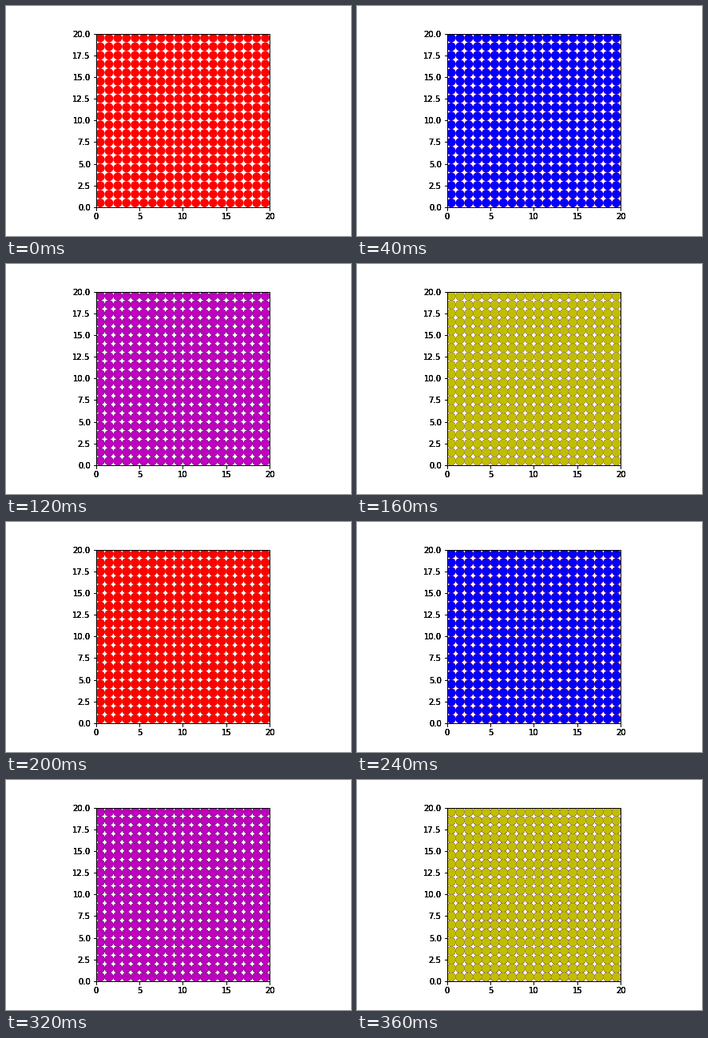
Write a matplotlib script that moves like this. It is 432 px wide and 288 px high and loops after 0.4 s.

```python
import numpy as np
import matplotlib.pyplot as plt
from matplotlib.animation import FuncAnimation
from matplotlib.collections import PatchCollection
from matplotlib.patches import Circle

plt.rcParams.update({"font.family": "DejaVu Sans", "font.size": 10})

SIZE = 20
FRAMES = 10
COLORS = "rbgmy"
INK_PASSES = 4  # repeated axes give the dense, hard-edged labels

fig = plt.figure(figsize=(6, 4), dpi=72, facecolor="white")
fig.subplots_adjust(left=0.125, right=0.9, bottom=0.125, top=0.88)


def add_axes(facecolor):
    ax = fig.add_subplot(111, aspect="equal", facecolor=facecolor)
    ax.set(xlim=(0, SIZE), ylim=(0, SIZE))
    ax.set_xticks(np.arange(0, SIZE + 1, 5))
    ax.set_yticks(np.arange(0, SIZE + 1, 2.5))
    ax.yaxis.set_major_formatter("{x:.1f}")
    return ax


def add_layer(ax, color):
    discs = [Circle((x + 0.5, y + 0.5), 0.5)
             for x in range(SIZE) for y in range(SIZE)]
    layer = PatchCollection(discs, facecolor=color, edgecolor="none",
                            linewidth=0, zorder=1)
    return ax.add_collection(layer, autolim=False)


board = add_axes("white")
for _ in range(INK_PASSES - 1):
    add_axes("none")

layers = [add_layer(board, COLORS[i % len(COLORS)]) for i in range(FRAMES)]


def update(frame):
    # Discs pile up, so older colours show through the soft edges.
    for i, layer in enumerate(layers):
        layer.set_visible(i <= frame)
    return layers


anim = FuncAnimation(fig, update, frames=FRAMES, interval=40,
                     repeat=True, repeat_delay=0, blit=False)
plt.show()
```
